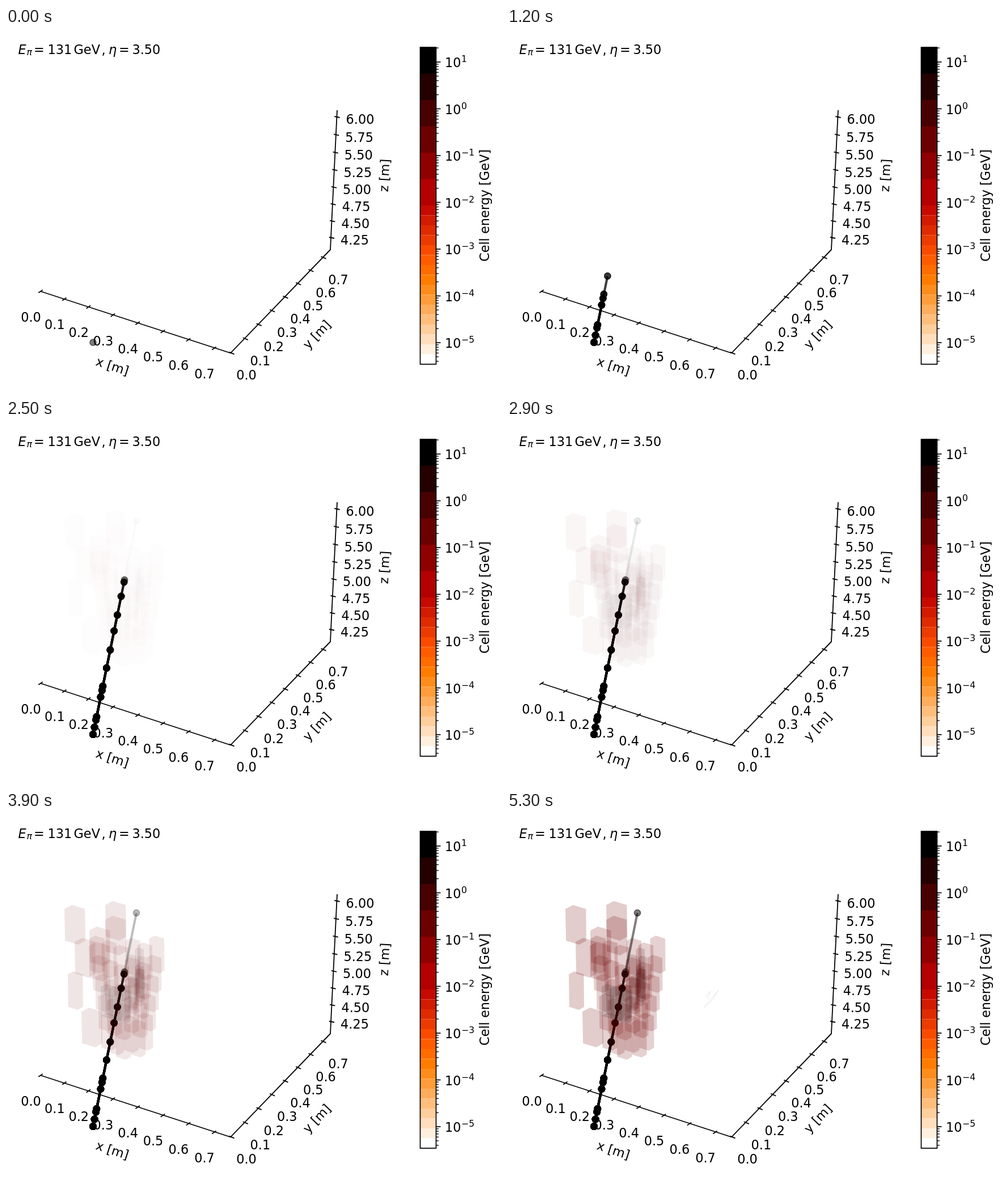
Recreate the animation shown at these times as an HTML page with a canvas. Size 873x642 px, loop 6.3 s.

```html
<!DOCTYPE html>
<html lang="en">
<head>
<meta charset="utf-8">
<title>Particle shower</title>
<style>
  html, body { margin: 0; width: 100%; height: 100%; overflow: hidden; background: #fff; }
  canvas { display: block; }
</style>
</head>
<body>
<canvas id="stage" width="873" height="642"></canvas>
<script>
const ctx = document.getElementById('stage').getContext('2d');
const SIZE = 22.4;
const STEP = 100, LOOP = 6300, LAST = 53;
const TRACK_END = 22, SHOWER_START = 24, FAR_CELL_START = 51;

const lerp = (a, b, u) => a + (b - a) * u;
const mix = (p, q, u) => [lerp(p[0], q[0], u), lerp(p[1], q[1], u)];

// "middle" is the height of the text's centre above its baseline, in ems.
function text(str, x, y, { size = SIZE, align = 'center', angle = 0, style = '', middle = 0.365 } = {}) {
  ctx.save();
  ctx.translate(x, y);
  ctx.rotate(angle * Math.PI / 180);
  ctx.font = `${style} ${size}px "DejaVu Sans", sans-serif`;
  ctx.textAlign = align;
  ctx.fillStyle = '#000';
  ctx.fillText(str, 0, size * middle);
  ctx.restore();
}

function trace(points) {
  ctx.beginPath();
  points.forEach(([x, y]) => ctx.lineTo(x, y));
}

function line(...points) {
  trace(points);
  ctx.stroke();
}

function drawTitle() {
  const left = { align: 'left' }, italic = { align: 'left', style: 'italic' };
  text('E', 21.5, 38, italic);
  text('π', 36.5, 42.5, { ...italic, size: SIZE * 0.7 });
  text('=', 49, 38, left);
  text('131', 73.5, 38, left);
  text('GeV', 119.5, 38, left);
  text(',', 168.5, 38, left);
  text('η', 181, 38, italic);
  text('=', 199, 38, left);
  text('3.50', 222.5, 38, left);
}

// Each axis has eight ticks between two points; "bend" shifts the inner ones for perspective.
const axes = [
  { from: [61, 464.5], to: [367, 565], bend: -0.05, tick: [3.7, -2.6], label: [-17, 45],
    value: i => (i / 10).toFixed(1), name: 'x [m]', nameAt: [187.5, 597], angle: 18 },
  { from: [398, 573.5], to: [560, 405], bend: 0.06, tick: [4.5, 1.9], label: [26, 38.5],
    value: i => (i / 10).toFixed(1), name: 'y [m]', nameAt: [548.5, 541], angle: -46.5 },
  { from: [584, 157], to: [574.5, 370], bend: 0.04, tick: [4.6, 1], label: [40.5, 4],
    value: i => (6 - i / 4).toFixed(2), name: 'z [m]', nameAt: [668, 260], angle: -87 }
];

function drawAxes() {
  ctx.strokeStyle = '#000';
  ctx.lineWidth = 1.8;
  line([61, 464.5], [396, 573.3], [572, 391], [584, 145]);
  for (const { from, to, bend, tick: [dx, dy], label, value, name, nameAt, angle } of axes) {
    for (let i = 0; i < 8; i++) {
      const u = i / 7;
      const [x, y] = mix(from, to, u + bend * u * (1 - u));
      line([x - dx, y - dy], [x + dx, y + dy]);
      text(value(i), x + label[0], y + label[1]);
    }
    text(name, ...nameAt, { angle, middle: 0.32 });
  }
}

// Heat palette: 0 is black, 1 is white.
const heat = v => `rgb(${[1.5 * v, 2 * v - 1, 4 * v - 3].map(c => 255 * Math.min(1, Math.max(0, c)))})`;

function drawColorbar() {
  const left = 730.5, right = 758.5, top = 34, bottom = 593, decade = 82.5;
  const split = 313, tall = 6, short = 16;
  for (let i = 0; i < tall; i++) {
    ctx.fillStyle = heat(0.094 * i);
    ctx.fillRect(left, lerp(top, split, i / tall), 28, 47);
  }
  for (let i = 0; i < short; i++) {
    ctx.fillStyle = heat(0.52 + 0.032 * i);
    ctx.fillRect(left, lerp(split, bottom, i / short), 28, 17.5);
  }
  ctx.strokeStyle = '#000';
  ctx.lineWidth = 1.7;
  ctx.strokeRect(left, top, right - left, bottom - top);
  for (let power = 1; power >= -6; power--) {
    const y = 60 + (1 - power) * decade;
    for (let n = 1; n < 10; n++) {
      const tick = y - Math.log10(n) * decade;
      if (tick < top || tick > bottom) continue;
      ctx.lineWidth = n === 1 ? 1.7 : 1.3;
      line([right, tick], [right + (n === 1 ? 8 : 4.5), tick]);
    }
    if (power < -5) continue;
    text('10', 774, y + 1, { align: 'left' });
    text(String(power).replace('-', '−'), 803, y - 5.5, { align: 'left', size: SIZE * 0.7 });
  }
  text('Cell energy [GeV]', 845, 313, { angle: -90, middle: 0.3 });
}

// The hits lie on a straight line and are reached at an even rate.
const start = [153.5, 554.5], end = [209, 282], exit = [230, 178];
const hitHeights = [554.5, 542, 529, 523.5, 488.5, 477, 469.5, 437.5, 405.5, 372, 344, 311, 286, 282];
const hits = hitHeights.map(y => mix(start, end, (start[1] - y) / (start[1] - end[1])));

function drawTrack(points, markers, alpha) {
  ctx.strokeStyle = ctx.fillStyle = `rgba(0,0,0,${alpha})`;
  ctx.lineWidth = 4;
  line(...points);
  ctx.lineWidth = 1.8;
  for (const [x, y] of markers) {
    ctx.beginPath();
    ctx.arc(x, y, 5.5, 0, 2 * Math.PI);
    ctx.fill();
    ctx.stroke();
  }
}

function seeded(seed) {
  return () => (seed = seed * 16807 % 2147483647) / 2147483647;
}

// Cells are upright hexagonal prisms: x, y is the top left of the silhouette.
function makeCells() {
  const cells = [], random = seeded(7);
  const add = (x, y, w, h, color = '111,0,0', opacity = 0.2) => cells.push({ x, y, w, h, color, opacity });

  for (const [x, y] of [[103, 164], [175, 157], [175, 183], [147, 202], [121, 222], [146, 229], [133, 345]])
    add(x, y, 37, 70);
  add(109, 281, 27, 68);

  // Stacked layers that widen upwards.
  for (let layer = 0; layer < 5; layer++) {
    for (let i = 0; i < 6; i++) {
      const x = 200 + (i - 2.5) * (13 + 2 * layer);
      add(x, 362 - 34 * layer + (i * 2 % 5 - 2) * 4, 27, 67, '111,0,0', 0.18);
    }
  }
  // Dense core beside the track.
  for (let i = 0; i < 10; i++)
    add(205 + 32 * random(), 235 + 75 * random(), 16, 60, '77,0,0', 0.16);
  for (let i = 0; i < 3; i++)
    add(167 + 14 * i, 303 + 4 * i, 26, 62, '30,30,30', 0.16);
  return cells;
}
const cells = makeCells();

function drawShower(progress) {
  for (const { x, y, w, h, color, opacity } of cells) {
    const slant = w * 0.19;
    ctx.fillStyle = `rgba(${color},${opacity * progress})`;
    trace([
      [x, y + slant], [x + w * 0.36, y], [x + w * 0.98, y + slant],
      [x + w, y + h - slant], [x + w * 0.66, y + h], [x + w * 0.03, y + h - slant]
    ]);
    ctx.fill();
  }
}

function drawFarCell() {
  ctx.strokeStyle = '#e8e8e8';
  ctx.lineWidth = 1;
  line([347, 345], [373, 314], [362, 332], [347, 345]);
  line([350, 327], [358, 316], [354, 331]);
}

function draw(step) {
  ctx.fillStyle = '#fff';
  ctx.fillRect(0, 0, 873, 642);
  drawTitle();
  drawAxes();
  drawColorbar();

  // Every step paints the half-transparent track again, so older parts turn black.
  for (let s = 0; s <= Math.min(step, TRACK_END); s++) {
    const reached = hits.filter((hit, i) => Math.floor(i * TRACK_END / (hits.length - 1)) <= s);
    drawTrack(reached, reached, 0.5);
  }
  const progress = (step - SHOWER_START) / (LAST - SHOWER_START);
  if (progress > 0) {
    drawShower(progress);
    drawTrack([end, exit], [exit], 0.5 * progress);
  }
  if (step >= FAR_CELL_START) drawFarCell();
}

function tick() {
  draw(Math.min(LAST, Math.floor(performance.now() % LOOP / STEP)));
  requestAnimationFrame(tick);
}
tick();
</script>
</body>
</html>
```
